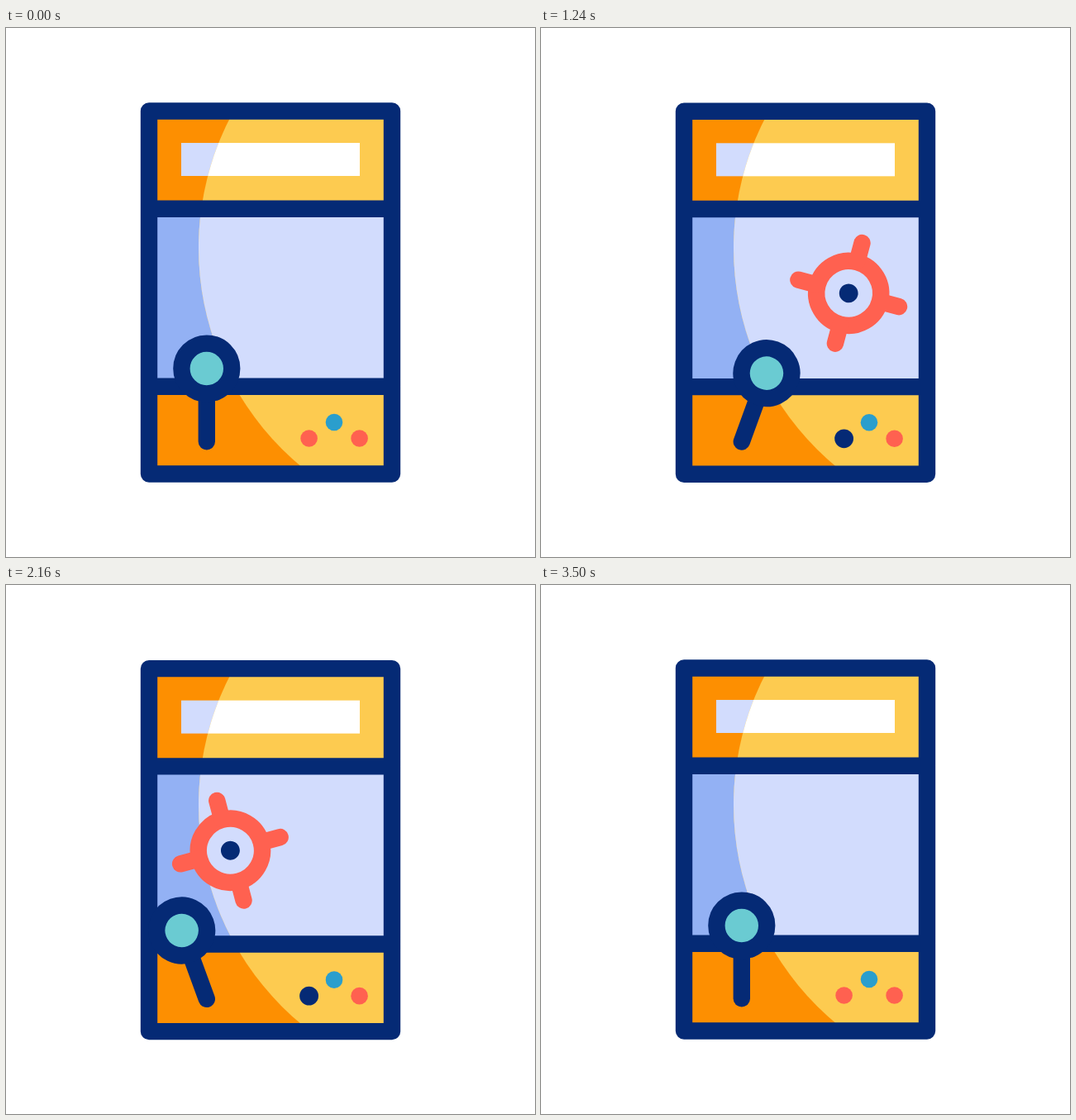
An HTML page that plays this animation: 640 by 640 pixels, repeating every 3.6 s.

```html
<!DOCTYPE html>
<html lang="en">
<head>
<meta charset="utf-8">
<title>Arcade machine</title>
<style>
  html, body { margin: 0; width: 100%; height: 100%; overflow: hidden; background: #fff; }
  svg { display: block; width: 100vw; height: 100vh; }
  .line { fill: none; stroke: #052a75; stroke-width: 20.4; stroke-linecap: round; stroke-linejoin: round; }
  .aim { fill: none; stroke: #ff6150; stroke-width: 20.4; stroke-linecap: round; }
</style>
</head>
<body>
<svg viewBox="0 0 640 640">
  <defs>
    <clipPath id="lit"><circle cx="577" cy="266" r="344"/></clipPath>
    <clipPath id="window"><rect x="173" y="219" width="294" height="215"/></clipPath>
  </defs>
  <g id="machine">
    <rect x="173" y="100.5" width="294" height="439" fill="#fd8f01"/>
    <rect x="173" y="219" width="294" height="215" fill="#93b1f4"/>
    <rect x="212" y="139" width="216" height="40" fill="#d2dcfd"/>
    <g clip-path="url(#lit)">
      <rect x="173" y="100.5" width="294" height="439" fill="#fdcb50"/>
      <rect x="173" y="219" width="294" height="215" fill="#d2dcfd"/>
      <rect x="212" y="139" width="216" height="40" fill="#fff"/>
    </g>
    <g clip-path="url(#window)">
      <g id="target">
        <circle id="ring" class="aim"/>
        <path id="pegs" class="aim"/>
        <circle id="dot"/>
      </g>
    </g>
    <circle id="button" cx="366.6" cy="496.5"/>
    <circle cx="397" cy="477" r="10.3" fill="#2a9ecd"/>
    <circle cx="427.6" cy="496.5" r="10.3" fill="#ff6150"/>
    <path class="line" d="M173 100.5H467V539.5H173ZM173 218.7H467M173 433.8H467"/>
    <g id="stick">
      <path class="line" d="M242.8 500.2V442"/>
      <circle class="line" cx="242.8" cy="412" r="30.4" style="fill:#6acbd2"/>
    </g>
  </g>
</svg>
<script>
const LOOP = 3600;
const SHOTS = [1200, 2100];
const KICK = 300, MOVE = 600;

const set = (id, attrs) => {
  const node = document.getElementById(id);
  for (const key in attrs) node.setAttribute(key, attrs[key]);
};

// Smooth rise from 0 to 1 that begins at `from` and lasts `span`.
function rise(t, from, span) {
  const p = Math.min(1, Math.max(0, (t - from) / span));
  return p * p * (3 - 2 * p);
}

// Each move starts when a shot has reached its peak.
const [back, out] = SHOTS.map(shot => shot + KICK);

const kick = t => SHOTS.reduce(
  (sum, shot) => sum + rise(t, shot, KICK) - rise(t, shot + KICK, KICK), 0);

const swing = t => rise(t, MOVE, MOVE) - 2 * rise(t, back, MOVE) + rise(t, out, 500);

const slide = t => 1 - rise(t, 100, 500) + rise(t, 2800, 510);

// Lean of the stick: -1 is left, 1 is right.
const lean = t => 2 * (rise(t, 500, 700) - rise(t, back, MOVE) + rise(t, out, MOVE))
  - rise(t, 0, 450) - rise(t, 3050, 450);

function draw(t) {
  const turn = swing(t), recoil = kick(t);
  const x = 321.8 + 50.4 * turn + 211 * slide(t);
  const size = 1 - 0.16 * recoil;
  const near = 40 * size, far = 63.5 * size;
  const firing = SHOTS.some(shot => t >= shot && t < shot + KICK);
  const light = firing ? { fill: '#052a75', r: 11.4 } : { fill: '#ff6150', r: 10.3 };

  set('machine', { transform: `translate(0 ${6 * recoil})` });
  set('target', { transform: `translate(${x} 320.6) rotate(${15 * turn})` });
  set('ring', { r: 39.3 * size });
  set('pegs', { d: `M0 ${-near}V${-far}M0 ${near}V${far}M${-near} 0H${-far}M${near} 0H${far}` });
  set('dot', light);
  set('button', light);
  set('stick', { transform: `rotate(${20 * lean(t)} 242.8 500.2)` });
}

const start = performance.now();
function tick() {
  draw((performance.now() - start) % LOOP);
  requestAnimationFrame(tick);
}
tick();
</script>
</body>
</html>
```
